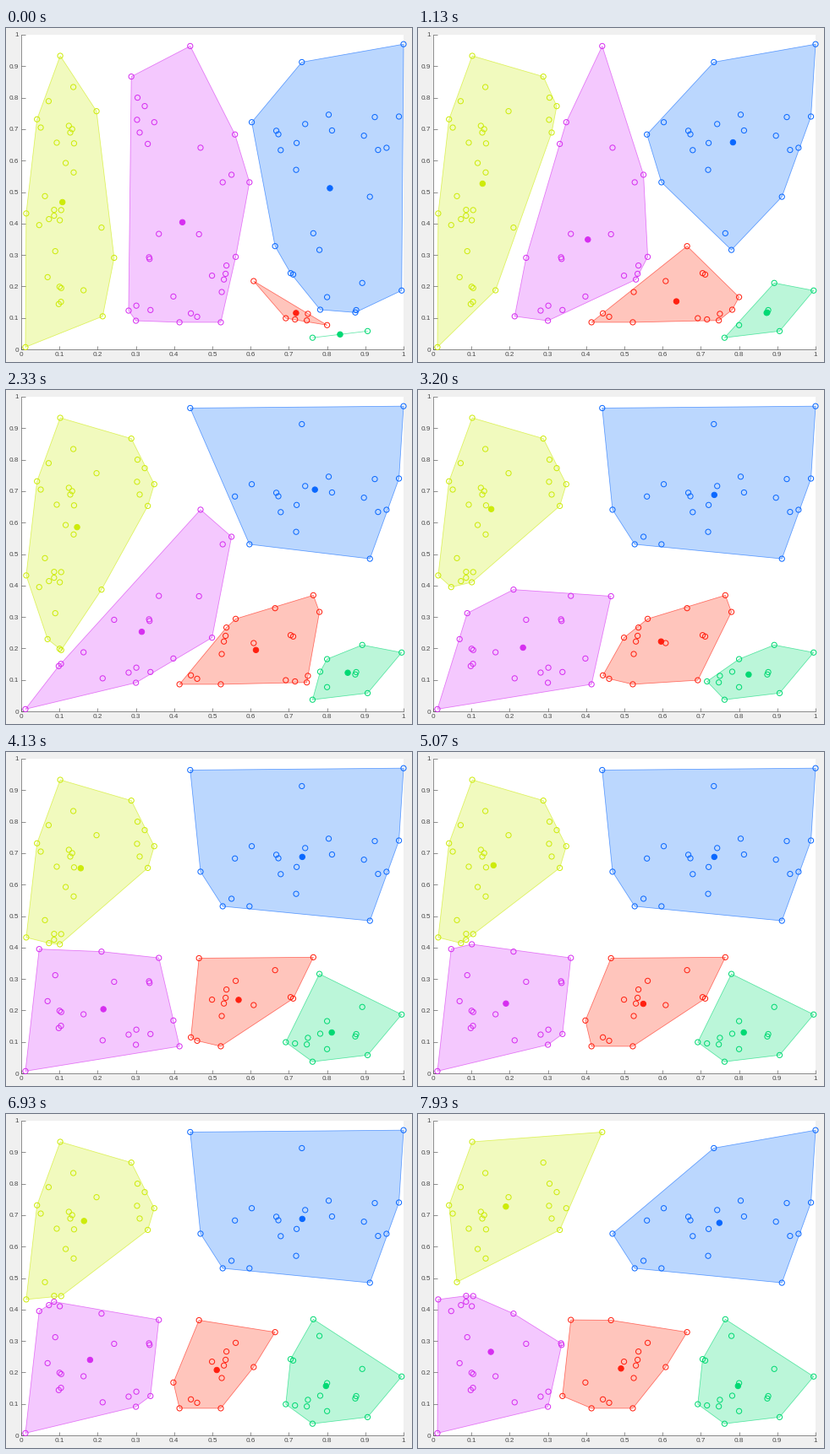
A matplotlib script for the animation above (8000 ms loop, 480x396 px).

```python
import numpy as np
import matplotlib.pyplot as plt
from matplotlib.animation import FuncAnimation
from matplotlib.colors import to_rgba
from matplotlib.patches import Polygon

W, H, DPI = 480, 396, 100
PX = 72 / DPI            # one pixel in points
STEPS, HOLD = 8, 1000    # iterations shown, ms each
INK = "#4a4a4a"

plt.rcParams["font.family"] = "Liberation Sans"
rng = np.random.default_rng(4)

# Starting means, each with its line and fill colour
STARTS = [
    ((.104, .151), "#cdeb0a", "#f1fabe"),
    ((.398, .168), "#d62ef0", "#f4c8fe"),
    ((.800, .166), "#0a68ff", "#bbd7fe"),
    ((.747, .092), "#ff2010", "#ffc5bc"),
    ((.762, .037), "#00d973", "#bbf6d9"),
]
seeds, lines, fills = zip(*STARTS)
K = len(STARTS)

# Corner points that shape the hulls
LEFT = [(.102, .933), (.197, .757), (.051, .705), (.062, .487), (.013, .432),
        (.047, .395), (.210, .387), (.089, .312), (.243, .291), (.011, .007),
        (.213, .105)]
MIDDLE = [(.288, .867), (.348, .722), (.331, .653), (.442, .964),
          (.469, .641), (.559, .683), (.550, .555), (.527, .531),
          (.597, .531), (.360, .367), (.465, .366), (.561, .294),
          (.300, .091), (.338, .125), (.414, .086), (.522, .086)]
RIGHT = [(.603, .722), (.734, .913), (1.00, .970), (.988, .740),
         (.912, .485), (.764, .369), (.780, .316), (.664, .328),
         (.608, .217), (.692, .099), (.800, .077), (.782, .126),
         (.892, .211), (.995, .187), (.906, .058)]

# Random fill: count, centre, half size
CLOUDS = [(10, (.112, .692), (.06, .16)), (5, (.090, .427), (.045, .02)),
          (5, (.107, .191), (.07, .06)), (4, (.310, .748), (.02, .07)),
          (5, (.525, .229), (.035, .085)), (12, (.794, .674), (.16, .10))]
PAIRS = [(.335, .290), (.291, .131), (.452, .109), (.708, .240),
         (.733, .104), (.875, .121)]


def cloud(count, centre, half):
    offset = rng.uniform(-1, 1, (count, 2))
    return centre + (offset - offset.mean(axis=0)) * half


points = np.vstack([seeds, LEFT, MIDDLE, RIGHT]
                   + [cloud(*c) for c in CLOUDS]
                   + [cloud(2, p, (.02, .02)) for p in PAIRS])


def nearest(centres):
    gap = points[:, None] - np.asarray(centres)[None]
    return (gap ** 2).sum(axis=2).argmin(axis=1)


def means(labels):
    return np.array([points[labels == k].mean(axis=0) for k in range(K)])


def half_hull(pts):
    chain = []
    for p in pts:
        while len(chain) > 1:
            (x0, y0), (x1, y1) = chain[-2:]
            if (x1 - x0) * (p[1] - y0) - (y1 - y0) * (p[0] - x0) > 0:
                break
            chain.pop()
        chain.append(p)
    return chain[:-1]


def hull(pts):
    pts = sorted(map(tuple, pts))
    return half_hull(pts) + half_hull(pts[::-1])


history = [nearest(seeds)]
for _ in range(STEPS - 1):
    history.append(nearest(means(history[-1])))

fig = plt.figure(figsize=(W / DPI, H / DPI), dpi=DPI, facecolor="#f0f0f0")
ax = fig.add_axes([18 / W, 15 / H, 452 / W, 373 / H], facecolor="white")
ax.set(xlim=(0, 1), ylim=(0, 1))
ticks = np.arange(11) / 10
names = [f"{t:g}" for t in ticks]
ax.set_xticks(ticks, names)
ax.set_yticks(ticks, names)
ax.tick_params(direction="in", length=4.5 * PX, width=0.6 * PX, color=INK,
               labelcolor=INK, labelsize=8.1 * PX, pad=3.2 * PX)
ax.spines[["top", "right"]].set_visible(False)
ax.spines[["left", "bottom"]].set(color=INK, linewidth=0.6 * PX)

areas = [ax.add_patch(Polygon([(0, 0), (0, 0)], facecolor=fill,
                              edgecolor=to_rgba(line, 0.6),
                              linewidth=0.8 * PX, joinstyle="round",
                              clip_on=False, zorder=1))
         for line, fill in zip(lines, fills)]
rings = ax.scatter(*points.T, s=(6.2 * PX) ** 2, facecolors="none",
                   linewidths=PX, clip_on=False, zorder=3)
dots = ax.scatter(*np.transpose(seeds), s=(6.4 * PX) ** 2, c=lines,
                  linewidths=PX, clip_on=False, zorder=4)


def draw(step):
    labels = history[step]
    for k, area in enumerate(areas):
        area.set_xy(hull(points[labels == k]))
    rings.set_edgecolor([lines[k] for k in labels])
    dots.set_offsets(means(labels))
    return [*areas, rings, dots]


anim = FuncAnimation(fig, draw, frames=STEPS, init_func=lambda: draw(0),
                     interval=HOLD, repeat=True, repeat_delay=0, blit=False)
plt.show()
```
